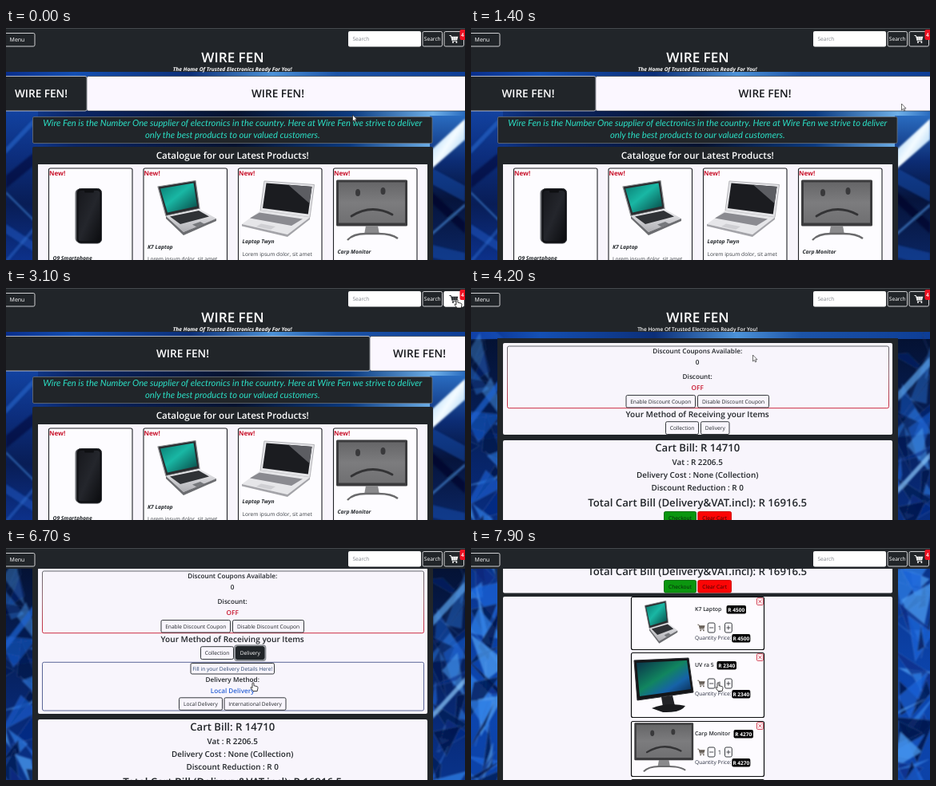
Animation of 574 by 291 pixels, one loop 8 s. Source, as an HTML page:

```html
<!DOCTYPE html>
<html lang="en">
<head>
<meta charset="utf-8">
<title>Shop</title>
<style>
html, body { margin: 0; width: 100%; height: 100%; overflow: hidden; background: #212529; }
svg { display: block; width: 574px; height: 291px; }
text { font-family: "Open Sans", "Noto Sans", sans-serif; text-rendering: geometricPrecision; white-space: pre; }
</style>
</head>
<body>
<svg id="stage" viewBox="0 0 574 291" xmlns="http://www.w3.org/2000/svg"></svg>
<script>
const LOOP = 8000, STEP = 100, MID = 283.2, EXTRA = 68;
const DARK = '#212529', PALE = '#f8f5fc', RED = '#c8142c', BLUE = '#2c63d6';
const SHOP = 'WIRE FEN', Shop = 'Wire Fen';

// --- drawing helpers (y of a text is its visual middle) ---
const text = (x, y, s, size, fill = DARK, weight = 400, anchor = 'middle', extra = '') =>
  `<text x="${x}" y="${y + size * 0.36}" font-size="${size}" fill="${fill}" font-weight="${weight}" text-anchor="${anchor}" ${extra}>${s}</text>`;
const box = (x, y, w, h, fill, stroke = 'none', r = 0, sw = 1) =>
  `<rect x="${x}" y="${y}" width="${w}" height="${h}" rx="${r}" fill="${fill}" stroke="${stroke}" stroke-width="${sw}"/>`;
const poly = (pts, fill, extra = '') => `<polygon points="${pts}" fill="${fill}" ${extra}/>`;
const path = (d, extra) => `<path d="${d}" ${extra}/>`;
const group = (s, attrs = '') => `<g ${attrs}>${s}</g>`;
const grad = (id, stops, dir = 'x2="0" y2="1"') => `<linearGradient id="${id}" ${dir}>` +
  stops.map(([o, c]) => `<stop offset="${o}" stop-color="${c}"/>`).join('') + '</linearGradient>';
const button = (x, y, w, h, label, fill = 'none', color = DARK, line = DARK) =>
  box(x + .5, y + .5, w - 1, h - 1, fill, line, 1.8, .9) + text(x + w / 2, y + h / 2, label, 6.65, color);
const ITALIC = 'font-style="italic"';

const defs = `<defs>
<filter id="soft" x="-5%" y="-5%" width="110%" height="110%"><feGaussianBlur stdDeviation="1.1"/></filter>
${grad('top', [[0, '#0a2f8c'], [.15, '#1450b4'], [.4, '#0c2f78'], [.58, '#4c92d8'], [.72, '#1c54a8'], [1, '#0d3d96']], 'x2="1" y2="0"')}
${grad('mid', [[0, '#1242a0'], [.15, '#0a2566'], [.5, '#06122e'], [.75, '#0b3a80'], [.93, '#6fb0e8'], [1, '#2a6cc0']], 'x2="1" y2="0"')}
${grad('west', [[0, '#1242a0'], [.3, '#0c2d7c'], [.6, '#081d56'], [1, '#0d3390']])}
${grad('east', [[0, '#2a6cc0'], [.3, '#0c2c74'], [.55, '#06143c'], [1, '#0b2766']])}
${grad('deep', [[0, '#04102e'], [.3, '#082a78'], [.6, '#0c46b0'], [1, '#0c3c9c']])}
${grad('beam', [[0, '#8cc8f6'], [.5, '#f4fbff'], [1, '#7fbdf0']], 'x2="1" y2="1"')}
${grad('teal', [[0, '#0a7a70'], [.45, '#19b7a4'], [1, '#06423f']], 'x2="1" y2="1"')}
${grad('aqua', [[0, '#0a2f4a'], [.45, '#11855f'], [.7, '#1662a8'], [1, '#0a2140']], 'x2="1" y2="1"')}
${grad('steel', [[0, '#ededf0'], [1, '#adadb2']])}
${grad('felt', [[0, '#666668'], [.5, '#7c7c7e'], [1, '#707072']])}
${grad('glass', [[0, '#17181d'], [.5, '#24262c'], [1, '#0c0d10']], 'x2="1" y2="1"')}
${grad('coupon', [[0, '#55585e'], [.45, '#8a5560'], [1, RED]])}
</defs>`;

// --- backdrops ---
const streak = (x, y, w, dy, thick, color, alpha) =>
  poly(`${x},${y} ${x + w},${y + dy} ${x + w},${y + dy + thick} ${x},${y + thick}`, color, `opacity="${alpha}"`);

const homeSky = box(0, 50, 574, 30, 'url(#top)') + box(0, 80, 574, 80, 'url(#mid)') +
  box(-5, 104, 45, 195, 'url(#west)') + box(530, 110, 50, 190, 'url(#east)') + group(
    streak(0, 150, 34, -36, 8, '#2a68cc', .6) + streak(0, 185, 34, -28, 16, '#030c2c', .5) +
    streak(0, 205, 34, 34, 3, '#4a8ce0', .6) + streak(0, 246, 34, 22, 12, '#1c58c0', .55) +
    streak(0, 290, 34, -40, 6, '#2f70d0', .45) +
    poly('533,152 574,114 574,140 533,176', 'url(#beam)') +
    streak(533, 176, 41, 22, 20, '#1a4ca8', .55) + streak(533, 206, 41, 38, 14, '#020a26', .6) +
    streak(533, 256, 41, -36, 4, '#4f93e2', .6) + streak(533, 272, 41, 10, 16, '#1650b4', .5),
    'filter="url(#soft)"');

function cartSky() {
  let seed = 11, out = '';
  const rnd = () => (seed = (seed * 16807) % 2147483647) / 2147483647;
  const tones = ['#1a63d8', '#041a50', '#4c9df2', '#0a2d88', '#2f7fe6', '#031040'];
  for (const left of [0, 534]) for (let i = 0; i < 60; i++) {
    const y = 60 + i * 10;
    const pts = [0, 1, 2].map(() => `${(left + rnd() * 60 - 12).toFixed(1)},${(y + rnd() * 80 - 30).toFixed(1)}`);
    const light = Math.min(.75, .35 + i * .015);
    out += poly(pts.join(' '), tones[i % 6], `opacity="${light}" stroke="#7fbcff" stroke-width=".5" stroke-opacity=".5"`);
  }
  return box(0, 50, 574, 720, 'url(#deep)') + box(0, 50, 574, 14, 'url(#top)') + group(out +
    streak(0, 160, 34, -44, 12, '#1f64d4', .7) + streak(534, 130, 40, -44, 12, '#5aa4ee', .7) +
    streak(534, 250, 40, -44, 8, '#8ecbff', .7), 'filter="url(#soft)"');
}

// --- product pictures ---
const phone = box(86.5, 202, 30, 67, '#6b6d72', 'none', 5) + box(88.5, 201.5, 31, 68.5, '#0e0f12', '#33353a', 5) +
  box(90.5, 204, 27, 63.5, 'url(#glass)', 'none', 3.5) + box(98, 203.5, 12, 3, '#0e0f12', 'none', 1.5);

const laptop = poly('190,199 237,191.5 242,226.5 200,235.5', '#2b2d30', 'stroke="#8b8d90" stroke-width="1.2" stroke-linejoin="round"') +
  poly('193,201.5 234.5,194.5 239,223.5 202,231.5', 'url(#teal)') +
  poly('200,236 242,227 263,239 222,256', 'url(#steel)') +
  poly('205,236.5 241,229 254,236.5 218,246', '#303236') +
  poly('233,246.5 243,243 248,245.7 238,249.5', '#77797d') +
  poly('200,236 222,256 263,239 263,242 222,260 200,239', '#6c6d71');

const slimLaptop = poly('323,192 385.5,196.5 380,237.5 318,229', '#e4e4e7', 'stroke="#b5b5b9" stroke-linejoin="round"') +
  poly('325.5,194.5 382.5,199 377.8,233.5 321,226', '#1b1c20') +
  poly('353,196.7 382.5,199 379.5,220', '#5c5d62') +
  poly('318,229 380,237.5 352,259 295,246', '#e6e6e9') +
  poly('317,231.5 371,239.5 357,248 305,238.5', '#8a8a90') +
  poly('319,245.5 337,249 331,253 313,249', '#cfcfd3') +
  poly('295,246 352,259 380,237.5 380,240 352,262 295,248.5', '#a4a4a9');

const sadMonitor = box(413, 190.5, 89, 58, '#3b3b3d', 'none', 1.5) + box(416, 193.5, 83, 51, 'url(#felt)') +
  path('M450 248H465L467 259H448Z', 'fill="#8a8a8c"') +
  path('M427 266Q434 258 450 258H466Q482 258 490 264', 'fill="none" stroke="#6a6a6c" stroke-width="2.4"') +
  '<ellipse cx="440" cy="206.5" rx="3" ry="4.5" fill="#39393b"/><ellipse cx="471.5" cy="204.5" rx="3" ry="4.5" fill="#39393b"/>' +
  path('M432 236Q457 220 483 234', 'fill="none" stroke="#333335" stroke-width="2.8" stroke-linecap="round"');

const tvMonitor = poly('204,141 272,138 278,181 208,191', '#141518', 'stroke="#2c2d31" stroke-linejoin="round"') +
  poly('207,144 270,141 275,177 211,186', 'url(#aqua)') +
  poly('238,187 252,185 255,198 240,199', '#222327') +
  path('M226 201Q246 193 268 198Q262 207 240 206Z', 'fill="#1a1b1e"');

const trolley = (x, y, color, k = 1) => group(
  path('M-5.5-4.5H-3.6L-1.8 2.2H4.2', `fill="none" stroke="${color}" stroke-width="1"`) +
  path('M-3.2-3.2H5.4L4.2 1H-2Z', `fill="${color}"`) +
  path('M-2.6-1.2H5M-.4-3V1M2.2-3V1', 'stroke="#888" stroke-width=".35"') +
  `<circle cx="-1" cy="4" r="1" fill="${color}"/><circle cx="3.4" cy="4" r="1" fill="${color}"/>`,
  `transform="translate(${x} ${y}) scale(${k})"`);

// --- shared page top ---
const masthead = (slant) => box(0, 0, 574, 55, DARK) + text(283.5, 37, SHOP, 17.1, '#fff', 600) +
  text(283.3, 51.8, 'The Home Of Trusted Electronics Ready For You!', slant ? 6.65 : 6.5, '#fff', slant ? 700 : 600, 'middle', slant ? ITALIC : '');

const navbar = box(0, 0, 574, 26, DARK) + box(0, 0, 574, 1, '#45494d') +
  button(-3, 6, 39.5, 17.5, '', 'none', '#fff', '#e4e4e6') + text(14, 14.6, 'Menu', 7, '#fff') +
  box(428, 4, 91, 19.5, '#fff', 'none', 2) + text(433.5, 13.8, 'Search', 6.6, '#80858b', 400, 'start') +
  button(520.5, 4, 25.5, 19.5, 'Search', 'none', '#fff', '#e4e4e6') +
  button(547.5, 4, 25.5, 19.5, '', 'none', '#fff', '#e4e4e6') + trolley(560, 14, '#fff') +
  group(box(547.5, 4, 25.5, 19.5, '#fff', 'none', 2) + trolley(560, 14, DARK), 'id="cartHover"') +
  box(567.5, 2, 9, 13, '#ee1122', 'none', 2) + text(571, 8.8, '4', 6.6, '#fff', 600);

// --- first page ---
const card = (x, picture, name, nameY, blurb) =>
  box(x + .5, 176, 104.5, 140, '#fdfcff', '#202226', 2, 1.1) + picture +
  text(x + 1, 182.2, 'New!', 8, RED, 700, 'start') +
  text(x + 5.5, nameY, name, 6.7, DARK, 700, 'start', ITALIC) +
  (blurb ? text(x + 5.5, nameY + 15.7, 'Lorem ipsum dolor, sit amet', 6.65, '#3c4045', 400, 'start') : '');

const pitch = (y, s) => text(283.3, y, s, 11.2, '#2be0c6', 400, 'middle',
  `${ITALIC} style="font-family:Lato,'Open Sans',sans-serif"`);

const home = homeSky + masthead(true) +
  `<rect id="darkPanel" x="-13" y="60.5" height="43.5" rx="2" fill="${DARK}" stroke="#d8d8dc" stroke-width=".8"/>` +
  `<rect id="palePanel" y="60.5" height="43.5" rx="2" fill="#fbf7ff" stroke="${DARK}" stroke-width=".6"/>` +
  group(text(0, 82.3, SHOP + '!', 13.6, '#fff', 600), 'id="darkLabel"') +
  group(text(0, 82.3, SHOP + '!', 13.6, '#16181b', 600), 'id="paleLabel"') +
  box(33.5, 111.5, 499.5, 33, DARK, '#6d7278', 1.5, .8) +
  pitch(119, `${Shop} is the Number One supplier of electronics in the country. Here at ${Shop} we strive to deliver`) +
  pitch(134, 'only the best products to our valued customers.') +
  box(33, 149, 501, 160, DARK, 'none', 2) +
  text(MID, 160.3, 'Catalogue for our Latest Products!', 11.6, '#fff', 600) +
  box(40, 171, 487, 140, PALE) +
  card(53, phone, 'Q9 Smartphone', 288.3, false) +
  card(171.5, laptop, 'K7 Laptop', 274.3, true) +
  card(290, slimLaptop, 'Laptop Twyn', 268, true) +
  card(409, sadMonitor, 'Carp Monitor', 281, false);

// --- cart page ---
const coupons = box(45.5, 73, 477, 77.7, 'none', 'url(#coupon)', 2, .9) +
  text(MID, 79.3, 'Discount Coupons Available:', 8.2, DARK, 600) + text(MID, 93.5, '0', 8.2, DARK, 600) +
  text(MID, 111, 'Discount:', 8.2, DARK, 600) + text(MID, 125.2, 'OFF', 8.2, RED, 600) +
  button(193.5, 134, 87.5, 16.5, 'Enable Discount Coupon') + button(283, 134, 90, 16.5, 'Disable Discount Coupon') +
  text(MID, 158, 'Your Method of Receiving your Items', 10.1, DARK, 600) +
  button(243, 167.2, 42, 16.8, 'Collection') + button(287, 167.2, 36.5, 16.8, 'Delivery') +
  group(box(286, 166.2, 38.5, 18.8, 'none', '#8c9095', 3, 1.8) +
    button(287, 167.2, 36.5, 16.8, 'Delivery', DARK, '#fff'), 'id="picked"');

const delivery = box(45.5, 187.3, 477, 60.7, 'none', '#49568c', 2, .9) +
  button(230.5, 188, 105.5, 14.5, 'Fill in your Delivery Details Here!', 'none', '#25436f') +
  text(MID, 208.8, 'Delivery Method:', 8.2, DARK, 600) + text(MID, 222.6, 'Local Delivery', 8.2, BLUE, 600) +
  button(216, 231.3, 55, 16.5, 'Local Delivery') + button(272.5, 231.3, 78, 16.5, 'International Delivery');

const badge = (x, y, s, w) => box(x, y - 5.2, w, 10.4, '#050505', 'none', 2) + text(x + w / 2, y, s, 6.5, '#fff', 700);

function item(y, h, picture, name, price, badgeX) {
  const row = y + 39;
  return box(200.5, y + .5, 166, h, '#fdfbff', '#0c0d0f', 2, 1.2) + picture +
    text(280, y + 16, name, 6.9, DARK, 600, 'start') + badge(badgeX, y + 16.3, price, 24.5) +
    trolley(288, row, '#5c5248', .85) +
    button(295.7, row - 6.5, 9.8, 13, '') + button(317, row - 6.5, 9.8, 13, '') +
    path(`M298 ${row}h5.2M319.3 ${row}h5.2M321.9 ${row - 2.6}v5.2`, `stroke="${DARK}" stroke-width=".8"`) +
    text(311, row, '1', 7.6, DARK) +
    text(280, y + 52, 'Quantity Price:', 6.65, '#2b3040', 400, 'start') + badge(326.3, y + 52.2, price, 23) +
    box(357.5, y + 1.8, 7.8, 8.6, '#fff', RED, 1, .8) +
    path(`M359.3 ${y + 4}l4.2 4.2m0-4.2l-4.2 4.2`, `stroke="${RED}" stroke-width=".8"`);
}

const moved = (picture, attrs) => group(picture, `transform="${attrs}"`);
const items = item(301, 66, moved(laptop, 'translate(111 157) scale(.56 .78)'), 'K7 Laptop', 'R 4500', 319.5) +
  item(371, 81, moved(tvMonitor, 'translate(0 240)'), 'UV ra 5', 'R 2340', 307.5) +
  item(457, 69, moved(sadMonitor, 'translate(-138.5 305) scale(.83 .81)'), 'Carp Monitor', 'R 4270', 328.5) +
  item(530, 69, '', '', 'R 4270', 328.5);

const bill = box(40, 191, 487, 105.5, PALE, 'none', 2) +
  text(MID, 200.3, 'Cart Bill: R 14710', 13.1, DARK, 600) +
  text(MID, 218, 'Vat : R 2206.5', 9.9, DARK, 600) +
  text(MID, 234.3, 'Delivery Cost : None (Collection)', 9.9, DARK, 600) +
  text(MID, 250.8, 'Discount Reduction : R 0', 9.9, DARK, 600) +
  text(MID, 269, 'Total Cart Bill (Delivery&amp;VAT.incl): R 16916.5', 13.2, DARK, 600) +
  button(241, 280, 41, 16.5, 'Checkout', '#0b960f', '#06240a', '#086a0b') +
  button(283.3, 280, 42.7, 16.5, 'Clear Cart', '#fb0505', '#3a0404', '#c80404') +
  box(40, 301, 487, 400, PALE, 'none', 2);

const cart = cartSky() + masthead(false) + box(33, 63, 501, 700, DARK) +
  '<rect id="options" x="40" y="69" width="487" rx="2" fill="' + PALE + '"/>' +
  coupons + group(delivery, 'id="delivery"') + group(bill + items, 'id="lower"');

const arrow = path('M0 0V8L1.8 6.4 3.1 9 4.3 8.4 3.1 5.8H5.5Z', 'fill="#fff" stroke="#111" stroke-width=".6"');
const hand = path('M-1 1Q0-.6 1 1V4.2L5 5.2Q6.2 5.6 6 7L5.2 11H0L-2.8 7.2Q-3.2 5.8-1.8 6.2L-1 7Z',
  'fill="#fff" stroke="#111" stroke-width=".8" stroke-linejoin="round"');

document.getElementById('stage').innerHTML = defs +
  group(group(home, 'id="home"') + group(cart, 'id="cart"'), 'id="page"') + navbar +
  group(group(arrow, 'id="arrow"') + group(hand, 'id="hand"'), 'id="pointer"');

// --- motion ---
const ui = {};
document.querySelectorAll('[id]').forEach(e => ui[e.id] = e);
const show = (e, on) => e.setAttribute('display', on ? 'inline' : 'none');
const shift = (e, x, y) => e.setAttribute('transform', `translate(${x} ${y})`);
const sine = u => (1 - Math.cos(Math.PI * u)) / 2;
const clamp = u => Math.min(1, Math.max(0, u));

function track(keys, t, ease = sine) {
  let i = 0;
  while (i < keys.length - 2 && t >= keys[i + 1][0]) i++;
  const [t0, ...a] = keys[i], [t1, ...b] = keys[i + 1];
  const u = ease(clamp((t - t0) / (t1 - t0)));
  return a.map((v, k) => v + (b[k] - v) * u);
}

const SPLIT = [[810, 101], [3100, 455]];
const POINTER = [[0, 433.5, 109], [1300, 538.5, 95], [1900, 538.5, 95], [2900, 564, 14],
  [3400, 564, 14], [4200, 352.5, 84], [4400, 352.5, 84], [5000, 309, 168.5]];
const SCROLL = [[6400, 0], [6650, 44], [6800, 44], [7900, 308]];

function draw(t) {
  const onCart = t >= 3400, open = t >= 5200;
  const [split] = track(SPLIT, t);
  const [px, py] = track(POINTER, t);
  const [scroll] = track(SCROLL, t, t < 6800 ? sine : u => u);

  show(ui.home, !onCart);
  show(ui.cart, onCart);
  shift(ui.page, 0, -scroll);

  ui.darkPanel.setAttribute('width', split + 13);
  ui.palePanel.setAttribute('x', split);
  ui.palePanel.setAttribute('width', 579 - split);
  shift(ui.darkLabel, (split - 13) / 2, 0);
  shift(ui.paleLabel, (split + 579) / 2, 0);

  show(ui.picked, t >= 5000);
  show(ui.delivery, open);
  ui.delivery.setAttribute('opacity', clamp((t - 5250) / 1000));
  ui.options.setAttribute('height', open ? 183 : 115);
  shift(ui.lower, 0, open ? EXTRA : 0);

  const overCart = t >= 2800 && t < 3500;
  show(ui.cartHover, overCart);
  show(ui.hand, overCart || t >= 5000);
  show(ui.arrow, !overCart && t < 5000);
  shift(ui.pointer, px, py);
}

const start = performance.now();
function tick() {
  const t = (performance.now() - start) % LOOP;
  draw(Math.floor(t / STEP) * STEP);
  requestAnimationFrame(tick);
}
tick();
</script>
</body>
</html>
```
